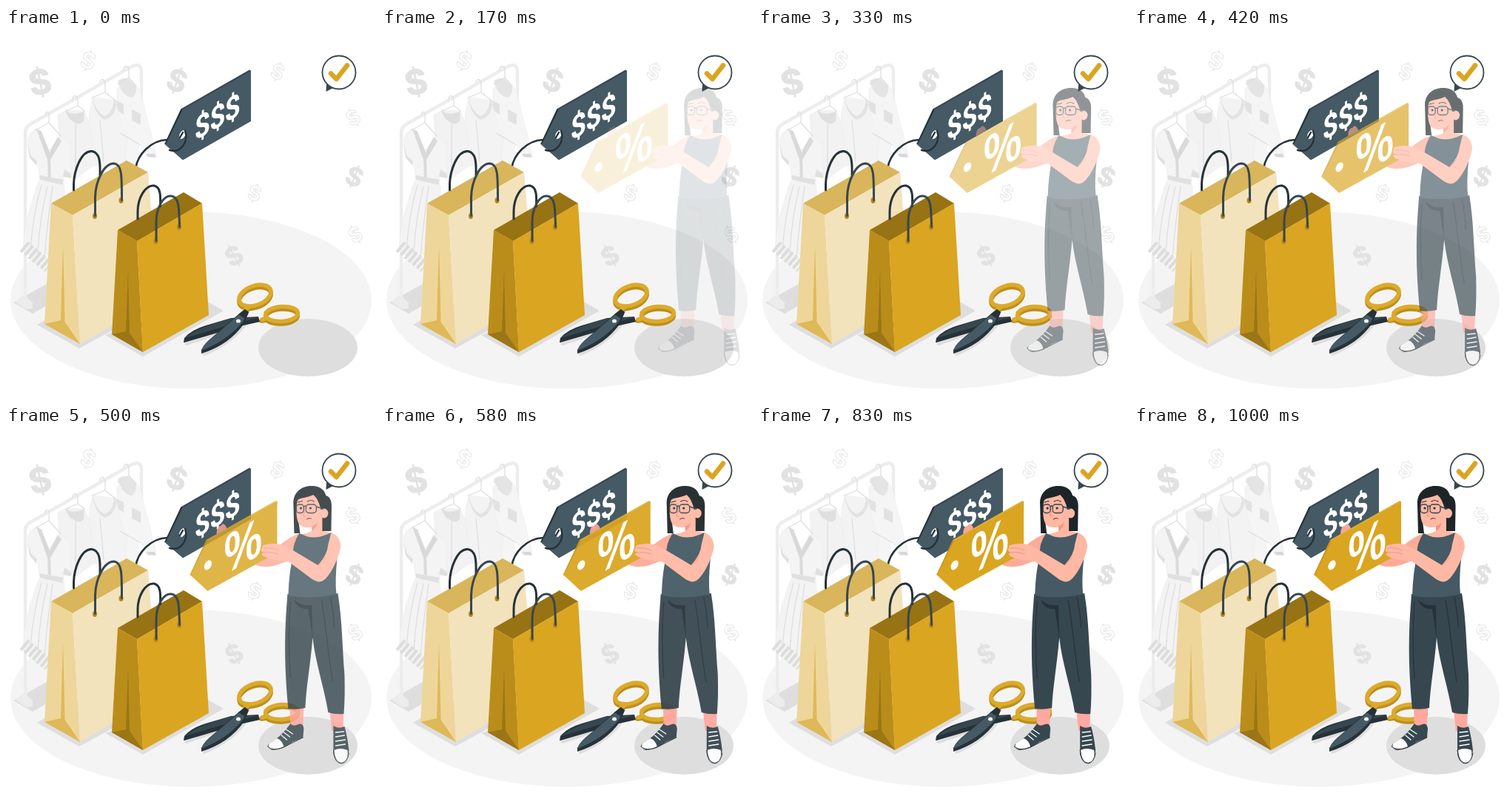
Animation, 500 px wide and 500 px high, one loop 1.04 s. Source, as an HTML page:

```html
<!DOCTYPE html>
<html lang="en">
<head>
<meta charset="utf-8">
<title>Discount shopping</title>
<style>
html, body { margin: 0; width: 100%; height: 100%; overflow: hidden; background: #fff; }
svg { display: block; width: 100%; height: 100%; }
text { text-anchor: middle; font-weight: 700; }
.line { fill: none; stroke-linecap: round; stroke-linejoin: round; }
</style>
</head>
<body>
<svg viewBox="0 0 500 500">
  <ellipse cx="250" cy="368" rx="244" ry="119.5" fill="#f4f4f4"/>
  <ellipse cx="408" cy="432" rx="67" ry="39" fill="#dedede"/>
  <g id="dollars" font-family="Inter, sans-serif"></g>

  <!-- clothes rack -->
  <path d="M10 371 L60 343 L86 357 L36 386Z" fill="#dedede"/>
  <path d="M12 370 L24 361 L36 371 V379 L27 380Z" fill="#ececec"/>
  <g class="line" stroke="#ededed" stroke-width="4.500">
    <path d="M26 370 V141 Q26 134 33 130 L168 53 Q183 45 183 60 V150"/>
    <path d="M164 70 V185"/>
  </g>
  <g stroke="#ebebeb" stroke-width=".5">
    <path d="M150 82 L164 70 Q178 72 182 88 L203 170 Q198 176 190 174 L180 150 L178 190 H150Z" fill="#f5f5f5"/>
    <path d="M151 72 Q158 66 166 69 L176 79 Q176 92 170 94 Q157 92 151 72Z" fill="#e4e4e4"/>
    <path d="M147 97 L159 103 V117 L147 109Z M170 110 L182 116 V131 L170 125Z" fill="#e2e2e2"/>
    <path d="M189 170 L201 170 L203 175 L192 174Z" fill="#d6d6d6"/>
    <path d="M117 93 L148 98 L156 130 L164 150 L160 190 L118 186 L112 118Z" fill="#f3f3f3"/>
    <path d="M117 93 Q121 114 134 119 Q146 113 146 95 L149 104 Q146 121 133 124 Q119 116 117 93Z" fill="#e2e2e2"/>
    <path d="M70 117 L82 111 L106 112 L113 128 L121 184 L92 205 L80 190 L72 150Z" fill="#f2f2f2"/>
    <path d="M80 111 Q91 120 106 112 L105 126 Q99 132 93 128 Q84 124 80 111Z" fill="#dfdfdf"/>
    <path d="M46 204 C34 230 24 270 23 300 L55 328 L86 300 L78 208Z" fill="#f3f3f3"/>
    <path d="M41 136 Q30 142 29 152 L32 174 L42 180 L46 205 L76 210 L80 193 L88 200 L87 164 Q85 150 73 147 L58 165Z" fill="#f4f4f4"/>
    <path d="M41 136 L48 140 L59 168 L70 147 L75 153 L60 178 L61 206 L57 205 L56 178Z" fill="#d9d9d9"/>
    <path d="M29 157 L34 173 L42 180 L41 186 L32 175Z M45 199 L78 205 L76 212 L46 205Z M79 191 L88 197 V203 L77 201Z" fill="#e0e0e0"/>
  </g>
  <path d="M24 295 L58 323" fill="none" stroke="#dcdcdc" stroke-width="17" stroke-dasharray="4 3"/>
  <g class="line" stroke="#dfdfdf" stroke-width="1.300">
    <path d="M48 212 Q37 250 33 298 M56 214 Q45 260 43 305 M63 214 Q55 270 52 312"/>
    <path d="M94 130 V190 M154 142 L182 158 M127 125 L132 180"/>
    <path d="M40 138 L58 128 L74 146 M58 128 V121 C60 112 53 112 53 117"/>
    <path d="M81 112 L97 105 L106 112 M97 105 V98 C97 90 90 90 90 96"/>
    <path d="M116 94 L134 87 L149 99 M134 87 V76 C134 68 127 68 127 74"/>
    <path d="M151 76 L166 67 L175 78 M166 67 V58 C166 50 159 50 159 56"/>
  </g>

  <!-- dark price tag -->
  <path class="line" d="M175 190 C178 171 195 152 218 151" stroke="#263238" stroke-width="2.600"/>
  <path d="M237 109 L329 56.500 L331 58 V66 L239 118Z" fill="#37474f"/>
  <path d="M236.500 109 L239 110.500 L217 158 L214 157Z" fill="#263238"/>
  <path d="M238.500 110.500 L331 58 V126 L239 178.500 L215.500 158Z" fill="#455a64"/>
  <ellipse cx="238.500" cy="144" rx="3.800" ry="6.200" fill="#fff" transform="rotate(28 238.500 144)"/>
  <path class="line" d="M239 141 L235 148 M242 139 C247 154 236 170 221 165" stroke="#263238" stroke-width="2.400"/>
  <g id="prices" fill="#fff" font-family="Roboto, sans-serif" font-size="43"></g>

  <!-- shopping bags -->
  <path d="M42 401 L99 433 L215 370 L200 330 L60 390Z M134 415 L185 444 L294 382 L268 367Z" fill="#dedede"/>
  <path d="M61 237 L163 179 L192 195 L90 253Z" fill="#d9b55b"/>
  <path class="line" d="M91.500 219 V211 C92 193 101 166 116 166.500 C127 168 127.500 182 127 199" stroke="#263238" stroke-width="3"/>
  <path d="M61 237 L90 253 L100 427 L52 400Z" fill="#eed69a"/>
  <path d="M90 253 L192 195 L206 366 L100 427Z" fill="#f2e3bd"/>
  <path d="M77 293 L79.500 397 L100 427 L52 400 L74 395Z" fill="#dfb858"/>
  <path class="line" d="M120.500 253 V229 C121 207 132 183 146 183 C157 184 156.500 201 156.500 232" stroke="#37474f" stroke-width="3"/>
  <path d="M151 273 L240 222 L265 237 L177 288Z" fill="#987314"/>
  <path class="line" d="M178 258 V248 C178 230 188 212 200 213 C209 215 209 226 208.500 241" stroke="#263238" stroke-width="3"/>
  <path d="M151 273 L177 288 L185 438 L143 414Z" fill="#ba8d1b"/>
  <path d="M177 288 L265 237 L274 388 L185 438Z" fill="#daa520"/>
  <path d="M165 326 L167 412 L185 438 L143 414 L162 410Z" fill="#9b7516"/>
  <path class="line" d="M203 287 V262 C203 244 212 226 223 227 C234 228 234 243 234.500 269" stroke="#37474f" stroke-width="3"/>
  <g fill="#b4871b">
    <ellipse cx="120" cy="254" rx="3" ry="4"/><ellipse cx="155.500" cy="233" rx="3" ry="4"/>
    <ellipse cx="202.500" cy="288" rx="3" ry="4"/><ellipse cx="234" cy="269" rx="3" ry="4"/>
  </g>
  <path class="line" d="M120.500 249 V254 M156.500 228 V233 M203 283 V288 M234.500 264 V269" stroke="#37474f" stroke-width="2.600"/>

  <!-- scissors -->
  <path class="line" d="M244 427 L300 408 M268 441 Q305 425 322 402" stroke="#dedede" stroke-width="4"/>
  <g class="line" stroke-width="5.500">
    <g stroke="#bd8e1b">
      <ellipse cx="336.500" cy="365" rx="22.500" ry="13" transform="rotate(-20 336.500 365)"/>
      <ellipse cx="372.500" cy="390" rx="22" ry="10" transform="rotate(-4 372.500 390)"/>
      <path d="M328 380 L322 384 M352 395 L345 396"/>
    </g>
    <g stroke="#dcaa2c">
      <ellipse cx="336.500" cy="361.500" rx="22.500" ry="13" transform="rotate(-20 336.500 361.500)"/>
      <ellipse cx="372.500" cy="386.500" rx="22" ry="10" transform="rotate(-4 372.500 386.500)"/>
      <path d="M328 377 L323 381 M353 392 L346 394"/>
    </g>
  </g>
  <path d="M240 425 L241 419 Q250 408 270 402 L304 392 L341 390 L343 397 L316 403 L241 425Z" fill="#263238"/>
  <path d="M242 419 Q254 407 302 393 L341 391 L310 399Z" fill="#37474f"/>
  <path d="M264 440 L264 435 Q268 426 281 416 L314 387 L323 380 L328 384 L322 399 Q302 428 264 440Z" fill="#263238"/>
  <path d="M264 436 Q268 426 282 416 L315 387 L324 381 L327 384 L320 397 Q300 422 264 436Z" fill="#455a64"/>
  <path d="M314 387 L323 380 L328 384 L324 393Z" fill="#263238"/>
  <ellipse cx="314" cy="396" rx="3" ry="2.500" fill="#f5f5f5"/>

  <!-- shopper with discount tag -->
  <g id="shopper">
    <path d="M383 106 C382 89 395 80 409 81 C418 81 425 86 427 94 C434 96 435 104 434.500 112 L434 142 H421 V120 H389 L392 145 H384Z" fill="#1d2529"/>
    <path d="M279 145 Q280 134 285 135 Q288 129 292 136 L296 146 L286 155Z" fill="#f7a896"/>
    <path d="M392 145 Q380 148 362 163 L331 187 Q342 193 360 188 L379 181 L395 165Z" fill="#fcab97"/>
    <path d="M378 378 H397 L396 407 L379 408Z M432 384 H451 L450 412 H435Z" fill="#ffa8a0"/>
    <path d="M379 402 Q382 407 390 403 Q396 401 397 409 L396 421 L382 427 Q367 439 354 438 Q345 434 350 429 Q367 420 379 402Z" fill="#37474f"/>
    <path d="M350 429 L361 422 Q368 425 370 433 Q358 440 349 435Z" fill="#fff"/>
    <path d="M437 405 Q444 410 452 406 Q456 420 458 438 Q457 452 449 456 Q440 455 437 443Z" fill="#37474f"/>
    <path d="M438 438 Q446 434 456 438 Q458 453 448 455 Q439 454 438 438Z" fill="#fff"/>
    <g class="line">
      <path d="M367 418 L374 424 M370 414 L378 420 M373 410 L382 416 M440 432 L453 430 M440 426 L453 424 M440 420 L452 418 M440 414 L451 413" stroke="#fff" stroke-width="1.300"/>
      <path d="M348 433 Q355 440 370 434 L396 421 M437 438 Q438 456 448 456 Q456 455 458 442" stroke="#263238" stroke-width="1"/>
    </g>
    <path d="M375 227 Q408 233 443 226 C449 262 449 300 452 335 Q453 366 451 389 Q439 390 430 387 C424 351 413 321 409 286 C406 322 400 354 399 381 Q387 384 376 382 C373 349 370 308 373 255Z" fill="#37474f"/>
    <path d="M384 235 Q388 248 403 247 L409 287 Q408 258 408 242 Q394 244 384 235Z" fill="#263238"/>
    <path class="line" d="M379 238 Q375 285 379 340 M421 235 C427 270 430 310 436 345 M433 231 Q438 257 438 272" stroke="#263238" stroke-width="1.200"/>
    <path d="M408 130 L422 122 V142 Q434 143 442 149 L428 156 H393 L391 146 Q400 146 408 142Z" fill="#ffb8a3"/>
    <path d="M391 145 L396 147 Q409 154 427 147 L434 144 Q434 161 442 180 Q439 209 441 227 Q408 235 376 229 Q377 196 383 174 Q381 160 391 145Z" fill="#455a64"/>
    <path d="M388 102 C386 116 387 128 391 133 Q397 139 408 136 Q418 132 422 122 L421 96 L410 90 L392 94Z" fill="#ffb8a3"/>
    <path d="M400 137 Q411 136 416 130 Q414 138 408 142V136Z" fill="#f29483"/>
    <path d="M383 106 Q387 98 397 97 Q406 95 410 93 Q417 99 420 113 L426 112 V94 L411 83 L390 90Z" fill="#1d2529"/>
    <ellipse cx="424.500" cy="118" rx="5.500" ry="6.500" fill="#ffb8a3"/>
    <g class="line" stroke="#37474f" stroke-width="1.400">
      <rect x="387" y="106" width="10" height="11.500" rx="4"/>
      <rect x="400" y="106" width="14" height="11.500" rx="4"/>
      <path d="M397 109 Q399 107 400 109 M414 109 L423 112"/>
      <path d="M389 103 L395 101.500 M402 102 Q406 99 411 102" stroke="#263238" stroke-width="1.200"/>
      <path d="M400 113 Q397 118 396 121 L399 122" stroke="#ee8c7c" stroke-width="1"/>
      <path d="M401 126 Q404 124 407 125" stroke="#a5423c" stroke-width="1.300"/>
    </g>
    <circle cx="393" cy="111" r="1.600" fill="#263238"/>
    <circle cx="406" cy="111" r="1.600" fill="#263238"/>

    <path d="M265 154 L359 101 L361 102 V107 L268 158Z" fill="#dfae36"/>
    <path d="M265 154 L268 156 L245 203 L267 223 L243 201Z" fill="#c4941c"/>
    <path d="M267 155 L361 102 V171 L267 223 L244 201.500Z" fill="#daa520"/>
    <ellipse cx="267.500" cy="188" rx="4.500" ry="7" fill="#fff" transform="rotate(28 267.500 188)"/>
    <text transform="matrix(.866 -.5 0 1 315 161.500)" y="25.500" font-size="72" font-family="'Open Sans', sans-serif" style="font-weight:600" fill="#fff">%</text>

    <path d="M434 144 Q446 148 447 163 C444 180 432 204 423 209 Q417 213 407 206 L376 183 Q358 183 343 176 Q338 173 343 171 Q337 168 341 165 Q339 161 347 160 Q362 157 373 163 L384 169 L416 188 Q429 174 430 160Z" fill="#ffb8a3"/>
    <path class="line" d="M343 165 Q355 164 362 168 M343 171 Q354 170 362 173 M417 188 Q423 183 426 177" stroke="#f29483" stroke-width="1"/>
  </g>

  <!-- approval bubble -->
  <path d="M433 76 L432.500 86 L444 80Z" fill="#37474f"/>
  <circle cx="450" cy="60" r="22.500" fill="#fff" stroke="#37474f" stroke-width="1.800"/>
  <path class="line" d="M439 61.500 L446.500 69 L461 50.500" stroke="#daa520" stroke-width="6.500"/>
</svg>
<script>
const byId = id => document.getElementById(id);
const sign = (transform, size, attrs) =>
  `<text transform="${transform}" y="${size * 0.36}" ${attrs}>$</text>`;

// x, y, angle, size
const filled = [[46, 73, -12, 47], [231, 71, 19, 41], [308, 308, -28, 35], [471, 201, 22, 35]];
const outlined = [[111, 44, 17, 30], [367, 59, 17, 27], [469, 121, -28, 27], [336, 223, 17, 27], [472, 279, -28, 27]];
const scatter = (list, style) => list.map(([x, y, angle, size]) =>
  sign(`translate(${x} ${y}) rotate(${angle})`, size, `font-size="${size}" ${style}`)).join("");

byId("dollars").innerHTML = scatter(filled, 'fill="#e2e2e2" style="font-weight:800"') +
  scatter(outlined, 'fill="#fff" stroke="#e6e6e6" stroke-width="1"');
byId("prices").innerHTML = [0, 1, 2].map(i =>
  sign(`matrix(.866 -.5 0 1 ${265.5 + i * 20.4} ${131 - i * 12})`, 43, "")).join("");

// cubic-bezier(.36, -.01, .5, 1.38)
const cubic = (a, b, s) => 3 * a * s * (1 - s) ** 2 + 3 * b * s * s * (1 - s) + s ** 3;
function ease(t) {
  if (t >= 1) return 1;
  let low = 0, high = 1;
  for (let i = 0; i < 24; i++) {
    const mid = (low + high) / 2;
    if (cubic(0.36, 0.5, mid) < t) low = mid; else high = mid;
  }
  return cubic(-0.01, 1.38, low);
}

const LOOP = 1040, FPS = 24;
const shopper = byId("shopper");
let start;
function draw(now) {
  start ??= now;
  const ms = (now - start) % LOOP;
  const step = Math.floor((ms + 5) * FPS / 1000);
  const p = ms < 80 ? 0 : ease((step + 1) / FPS);
  shopper.setAttribute("transform", `translate(${30 * (1 - p)} 0)`);
  shopper.setAttribute("opacity", Math.max(0, Math.min(1, p)));
  requestAnimationFrame(draw);
}
draw(performance.now());
</script>
</body>
</html>
```
